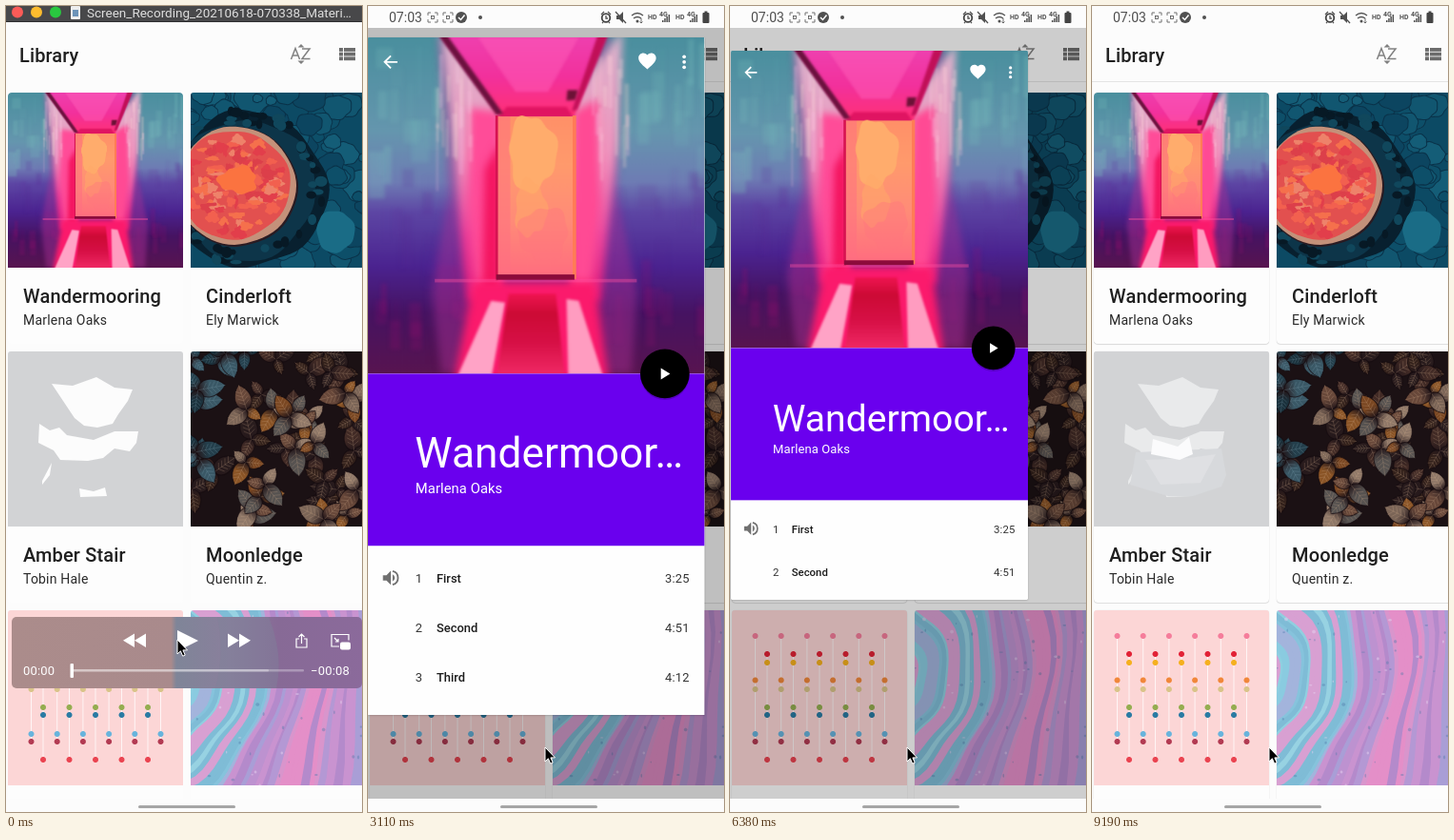
Animation, 374 px wide and 847 px high, one loop 9480 ms. Source, as an HTML page with a canvas:

```html
<!DOCTYPE html>
<html lang="en">
<head>
<meta charset="utf-8">
<title>Library</title>
<style>
  html, body { margin: 0; width: 100%; height: 100%; overflow: hidden; background: #fcfcfc; }
  #stage { position: absolute; left: 0; top: 0; width: 374px; height: 847px; overflow: hidden; background: #fcfcfc; }
  #stage div, #stage svg, #stage canvas { position: absolute; left: 0; top: 0; }
  svg { overflow: visible; pointer-events: none; }
  text { font-family: Roboto, "Open Sans", sans-serif; white-space: pre; }
  #clip { width: 374px; height: 833px; overflow: hidden; }
  .card { width: 184px; height: 264px; background: #fdfdfd; border-radius: 4px; }
  .card canvas { width: 184px; height: 184px; border-radius: 3px 3px 0 0; }
  .lined .card { box-shadow: 0 0 1px rgba(0,0,0,.2), 0 1px 1px rgba(0,0,0,.1); }
  #rule { width: 374px; height: 1px; top: 79px !important; background: #e4e4e4; }
  #scrim { width: 374px; height: 810px; top: 23px !important; background: #000; }
  #box { overflow: hidden; }
  #first, #detail { transform-origin: 0 0; }
  #detail { width: 383px; height: 810px; background: #fefefe; }
</style>
</head>
<body>
<div id="stage">
  <div id="clip">
    <div id="grid"></div>
    <svg id="bar" width="374" height="80"></svg>
    <div id="rule"></div>
    <div id="scrim"></div>
    <div id="box">
      <div id="first" class="card"></div>
      <div id="detail"></div>
    </div>
  </div>
  <svg id="status" width="374" height="23"></svg>
  <svg id="nav" width="374" height="847"></svg>
  <svg id="player" width="374" height="847"></svg>
  <svg id="cursor" width="20" height="24"></svg>
</div>
<script>
const $ = id => document.getElementById(id);
const clamp = v => Math.min(1, Math.max(0, v));
const mix = (a, b, k) => a + (b - a) * k;

function random(seed) {
  return () => (seed = seed * 16807 % 2147483647) / 2147483647;
}

function text(x, y, size, str, fill = '#1f1f1f', extra = '') {
  return `<text x="${x}" y="${y}" font-size="${size}" fill="${fill}" ${extra}>${str}</text>`;
}
const path = (d, fill, extra = '') => `<path d="${d}" fill="${fill}" ${extra}/>`;
const rect = (x, y, w, h, fill, extra = '') =>
  `<rect x="${x}" y="${y}" width="${w}" height="${h}" fill="${fill}" ${extra}/>`;
const dot = (x, y, r, fill, extra = '') => `<circle cx="${x}" cy="${y}" r="${r}" fill="${fill}" ${extra}/>`;

function canvas(size, paint) {
  const c = document.createElement('canvas');
  c.width = c.height = size;
  paint(c.getContext('2d'));
  return c;
}

function fade(g, x0, y0, x1, y1, stops) {
  const f = g.createLinearGradient(x0, y0, x1, y1);
  stops.forEach(([at, color]) => f.addColorStop(at, color));
  return f;
}

function poly(g, fill, ...pts) {
  g.beginPath();
  for (let i = 0; i < pts.length; i += 2) g.lineTo(pts[i], pts[i + 1]);
  g.closePath();
  g.fillStyle = fill;
  g.fill();
}

function blob(g, x, y, rx, ry, fill, wobble = 0, phase = 0) {
  g.beginPath();
  for (let a = 0; a < 6.28; a += 0.1) {
    const k = 1 + wobble * (Math.sin(3 * a + phase) + 0.6 * Math.sin(7 * a + phase * 2));
    g.lineTo(x + rx * k * Math.cos(a), y + ry * k * Math.sin(a));
  }
  g.closePath();
  g.fillStyle = fill;
  g.fill();
}

// Neon corridor, 383 units wide
function corridor(g) {
  const rnd = random(41);
  g.fillStyle = fade(g, 0, 0, 0, 383, [[0, '#4a8f9e'], [.28, '#6596ae'], [.43, '#6e7cb4'],
    [.52, '#5d46a4'], [.68, '#4b2390'], [.82, '#461362'], [1, '#581450']]);
  g.fillRect(0, 0, 383, 383);
  g.filter = 'blur(2px)';
  for (let i = 0; i < 130; i++) {
    const x = rnd() * 383, y = rnd() * 330;
    g.fillStyle = y < 140 ? `rgba(125,195,190,${rnd() * .3})`
      : y < 240 ? `rgba(90,45,150,${rnd() * .22})` : `rgba(150,15,110,${rnd() * .25})`;
    g.fillRect(x, y, 6 + rnd() * 16, 20 + rnd() * 40);
  }
  g.filter = 'blur(5px)';
  // Glowing walls on both sides of the door
  poly(g, 'rgba(170,50,150,.45)', 80, 0, 278, 0, 284, 180, 306, 290, 300, 383, 84, 383, 72, 290, 92, 180);
  poly(g, fade(g, 0, 0, 0, 300, [[0, '#dcb3cc'], [.45, '#ee94be'], [.75, '#ea3c98'], [1, '#e21b7c']]),
    82, -9, 150, 70, 152, 300, 112, 300, 104, 215, 98, 120);
  poly(g, fade(g, 0, 0, 0, 300, [[0, '#dcb3cc'], [.45, '#f093bd'], [.75, '#ec479e'], [1, '#e21b7c']]),
    290, -9, 232, 70, 230, 300, 265, 300, 274, 215, 284, 120);
  poly(g, '#ff4c98', 116, 80, 150, 85, 150, 300, 124, 300, 114, 190);
  poly(g, '#ff4a94', 234, 85, 262, 70, 264, 190, 252, 300, 232, 300);
  poly(g, '#f41560', 133, 150, 150, 120, 150, 290, 130, 290);
  poly(g, '#fb1a6c', 120, 278, 258, 278, 274, 390, 98, 390);
  g.filter = 'blur(1.5px)';
  for (let i = 0; i < 34; i++) {
    g.fillStyle = `rgba(250,${185 + rnd() * 45},${205 + rnd() * 25},.28)`;
    g.fillRect((i % 2 ? 254 : 76) + rnd() * 42, 15 + rnd() * 110, 2 + rnd() * 4, 20 + rnd() * 60);
  }
  poly(g, fade(g, 0, 0, 0, 90, [[0, '#ee3fae'], [.5, '#f2309c'], [1, '#ff2f75']]), 80, -5, 272, -5, 235, 90, 149, 90);
  poly(g, 'rgba(255,95,185,.5)', 125, 0, 240, 0, 205, 62, 168, 62);
  poly(g, '#e01462', 158, 79, 226, 79, 234, 91, 148, 91);
  poly(g, '#6b123e', 79, -4, 89, -4, 154, 87, 146, 88, 130, 66);
  poly(g, '#c01058', 262, -4, 274, -4, 238, 82, 232, 84);
  poly(g, '#6c1236', 227, 60, 239, 60, 236, 71, 226, 72);
  poly(g, '#ffa3c6', 140, 300, 156, 302, 140, 390, 100, 390);
  poly(g, '#ff9cc0', 226, 298, 240, 300, 269, 390, 228, 390);
  poly(g, fade(g, 0, 292, 0, 383, [[0, '#ee1450'], [.25, '#cc0a35'], [.6, '#d60f45'], [1, '#ef2863']]),
    160, 292, 214, 292, 224, 390, 146, 390);
  g.filter = 'none';
  g.fillStyle = fade(g, 0, 90, 0, 272, [[0, '#ff9068'], [.3, '#ff9a6c'], [.65, '#ff8b78'], [1, '#ff6d7f']]);
  g.fillRect(148, 90, 87, 185);
  g.fillStyle = 'rgba(255,110,130,.5)';
  g.fillRect(148, 90, 14, 182);
  blob(g, 187, 132, 27, 43, '#ffac6c', .09, 2);
  blob(g, 185, 195, 18, 32, 'rgba(255,170,105,.55)', .1, 1);
  blob(g, 200, 225, 28, 32, 'rgba(255,115,125,.4)', .1, 4);
  g.fillStyle = '#d61251';
  g.fillRect(145, 89, 3, 188);
  g.fillStyle = '#ff7c55';
  g.fillRect(233, 89, 4, 186);
  g.fillStyle = 'rgba(255,80,160,.4)';
  g.fillRect(76, 275, 230, 4);
  g.fillStyle = '#8c0b3b';
  g.fillRect(146, 270, 89, 6);
}

function cell(g) {
  const rnd = random(77);
  g.fillStyle = '#0c4a64';
  g.fillRect(0, 0, 184, 184);
  for (let i = 0; i < 90; i++) {
    const x = rnd() * 184, y = rnd() * 184, r = 4 + rnd() * 15;
    blob(g, x, y, r + 1, r * .85 + 1, '#0a3249', .06, i);
    blob(g, x, y, r, r * .85, ['#0d4f69', '#115670', '#0c4560', '#145d77'][i % 4], .06, i);
  }
  blob(g, 62, 102, 80, 82, '#08202f', .035, 1);
  blob(g, 58, 102, 73, 74, '#0d3549', .03, 3);
  for (let i = 0; i < 60; i++) {
    const a = rnd() * 6.28, r = 66 + rnd() * 16;
    blob(g, 58 + r * Math.cos(a), 100 + r * Math.sin(a), 3 + rnd() * 4, 2 + rnd() * 4, i % 2 ? '#071925' : '#10475c');
  }
  blob(g, 152, 146, 20, 22, '#1a6c86', .04, 2);
  blob(g, 49, 99, 63, 63, '#2a1b22', .012, 1);
  blob(g, 48, 98, 62, 62, '#c4917a', .012, 1);
  blob(g, 46, 97, 58, 57, '#e2504f', .02, 2);
  for (let i = 0; i < 110; i++) {
    const a = rnd() * 6.28, r = Math.sqrt(rnd()) * 52;
    blob(g, 46 + r * Math.cos(a), 96 + r * Math.sin(a), 2 + rnd() * 7, 2 + rnd() * 5,
      ['#f2604f', '#f5704c', '#e23e4b', '#ee826a', '#dc3f4a'][i % 5], .15, i);
  }
  blob(g, 50, 92, 20, 14, '#fb7340', .12, 5);
}

function leaf(g, x, y, len, angle, fill, vein) {
  g.save();
  g.translate(x, y);
  g.rotate(angle);
  g.beginPath();
  g.moveTo(0, 0);
  g.bezierCurveTo(len * .1, -len * .42, len * .65, -len * .42, len, 0);
  g.bezierCurveTo(len * .65, len * .42, len * .1, len * .42, 0, 0);
  g.fillStyle = fade(g, 0, 0, len, 0, [[0, '#24171a'], [.45, fill], [1, fill]]);
  g.fill();
  g.strokeStyle = 'rgba(20,10,14,.7)';
  g.stroke();
  g.strokeStyle = vein;
  g.lineWidth = .6;
  g.beginPath();
  g.moveTo(0, 0);
  g.lineTo(len, 0);
  for (let k = .2; k < .8; k += .15) {
    g.moveTo(len * (k + .14), -len * .2);
    g.lineTo(len * k, 0);
    g.lineTo(len * (k + .14), len * .2);
  }
  g.stroke();
  g.restore();
}

function leaves(g) {
  const rnd = random(905);
  g.fillStyle = '#1b1114';
  g.fillRect(0, 0, 184, 184);
  for (let i = 0; i < 46; i++) {
    const x = rnd() * 184, y = rnd() * 184, turn = rnd() * 6.28;
    const cold = x + y * .55 < 80;
    const tones = cold ? ['#243f4c', '#3a5866', '#1b323d'] : i < 24 ? ['#33211b', '#422b26', '#2a1d1e']
      : ['#8a5426', '#7b6557', '#68483a', '#8f7868', '#575351', '#7a4722'];
    for (let k = 0; k < 3; k++) {
      leaf(g, x, y, 16 + rnd() * 14, turn + k * 1.9, tones[(i + k) % tones.length],
        cold ? 'rgba(130,165,180,.35)' : 'rgba(215,180,145,.32)');
    }
  }
}

function beads(g) {
  g.fillStyle = '#fcd6d6';
  g.fillRect(0, 0, 184, 184);
  const column = (row, k) => row ? 37 + 27.5 * k : 24.5 + 27.2 * k;
  g.fillStyle = 'rgba(255,255,255,.75)';
  for (let k = 0; k < 6; k++) g.fillRect(column(0, k) - .5, 27, 1, 111);
  for (let k = 0; k < 5; k++) g.fillRect(column(1, k) - .5, 46, 1, 111);
  [[27, 0, '#f57d9b'], [46, 1, '#e22236'], [55, 1, '#f5b01e'], [73.5, 0, '#f1873a'], [83, 0, '#d9c489'],
   [102, 1, '#94ad50'], [110, 1, '#2a7ba3'], [130, 0, '#68b4dc'], [138, 0, '#b23a52'], [157, 1, '#ea4350']]
    .forEach(([y, row, color]) => {
      for (let k = 0; k < 6 - row; k++) blob(g, column(row, k), y, 3, 3, color);
    });
}

function marble(g) {
  const rnd = random(12);
  const cold = ['#8fcfe0', '#86c3dc', '#97d2e2', '#d8a0d2', '#8acbe0', '#a3b4dc', '#7fbcd6'];
  const warm = ['#bd92d0', '#d995cc', '#b48acb', '#a99ed6', '#c993d0', '#e48fc8', '#b498d4'];
  g.fillStyle = '#b98fce';
  g.fillRect(0, 0, 184, 184);
  for (let r = 270; r > 10; r -= 2 + rnd() * 6) {
    const set = r > 125 ? warm : cold;
    blob(g, -38 + r * .08, 66, r * .92, r * 1.12, set[Math.floor(rnd() * 7)], .04 + rnd() * .012, 1 + r * .018);
  }
  for (let i = 0; i < 60; i++) {
    blob(g, rnd() * 184, rnd() * 184, .6 + rnd() * 1.4, .6 + rnd() * 1.4, i % 3 ? 'rgba(80,120,170,.4)' : 'rgba(230,210,240,.5)');
  }
}

function mask(g) {
  g.fillStyle = '#d2d3d5';
  g.fillRect(0, 0, 184, 184);
  const a = '#fcfcfc';
  poly(g, a, 46, 34, 68, 36, 93, 27, 112, 38, 131, 40, 126, 52, 116, 66, 110, 76, 94, 80, 80, 78, 70, 70, 58, 52);
  poly(g, a, 33, 76, 44, 83, 54, 80, 62, 88, 90, 93, 112, 84, 137, 84, 135, 96, 128, 105, 112, 102, 100, 112, 84, 115, 55, 114, 48, 104, 32, 96);
  poly(g, a, 36, 136, 46, 117, 44, 130, 36, 140);
  poly(g, a, 75, 144, 90, 147, 102, 143, 104, 152, 76, 153);
}

function softMask(g) {
  mask(g);
  g.fillStyle = 'rgba(208,211,214,.45)';
  g.fillRect(0, 0, 184, 184);
  poly(g, '#d7d9dc', 44, 106, 134, 102, 139, 130, 134, 142, 104, 152, 78, 152, 38, 140);
  poly(g, '#dfe0e3', 54, 114, 100, 112, 128, 108, 112, 138, 70, 140);
  poly(g, '#fbfbfc', 62, 92, 88, 100, 100, 90, 104, 108, 90, 114, 60, 108);
}

// Cards
function cardText(title, artist) {
  return `<svg width="184" height="264">${
    text(16, 221, 20, title, '#1f1f1f', 'font-weight="500" letter-spacing=".15"')}${
    text(16, 244, 14, artist, '#2a2a2a', 'letter-spacing=".2"')}</svg>`;
}
function fillCard(el, art, title, artist) {
  el.innerHTML = cardText(title, artist);
  el.prepend(art);
}
const album = 'Wandermooring', singer = 'Marlena Oaks';
const masks = [canvas(184, mask), canvas(184, softMask)];
[[194, 91, canvas(184, cell), 'Cinderloft', 'Ely Marwick'],
 [2, 363, masks[0], 'Amber Stair', 'Tobin Hale'],
 [194, 363, canvas(184, leaves), 'Moonledge', 'Quentin z.'],
 [2, 635, canvas(184, beads), '', ''],
 [194, 635, canvas(184, marble), '', '']].forEach(([x, y, art, title, artist]) => {
  const el = document.createElement('div');
  el.className = 'card';
  fillCard(el, art, title, artist);
  if (art === masks[0]) art.after(masks[1]);
  $('grid').append(el);
  el.style.left = x + 'px';
  el.style.top = y + 'px';
});
fillCard($('first'), canvas(383, corridor), album, singer);

// Album page
const tracks = [['First', '3:25'], ['Second', '4:51'], ['Third', '4:12'], ['Fourth', '2:34']];
const heart = 'M12 21.350l-1.450-1.320C5.400 15.360 2 12.280 2 8.500 2 5.420 4.420 3 7.500 3c1.740 0 3.410.810 4.500 2.090C13.090 3.810 14.760 3 16.500 3 19.580 3 22 5.420 22 8.500c0 3.780-3.400 6.860-8.550 11.540z';
$('detail').innerHTML = `<svg width="383" height="810">
  ${rect(0, 383, 383, 196, '#6a00ee')}
  ${path('M33.500 28H19M26 21l-7 7 7 7', 'none', 'stroke="#fff" stroke-width="2"')}
  ${path(heart, '#fff', 'transform="translate(306 15)"')}
  ${[22, 28, 34].map(y => dot(360, y, 2, '#fff')).join('')}
  ${text(53.5, 490, 48, album.slice(0, 10) + '…', '#fff')}
  ${text(54, 519, 16, singer, '#fff', 'letter-spacing=".1"')}
  ${dot(338, 385, 28, 'rgba(0,0,0,.18)')}${dot(338, 383, 28, '#000')}
  ${path('M333.500 376.500v13l10.500-6.500z', '#fff')}
  <g transform="translate(14 603.500)">
    ${path('M3 9v6h4l5 5V4L7 9zM14 8v8q2.500-1.200 2.500-4T14 8z', '#707070')}
    ${path('M14 4.300a7.900 7.900 0 0 1 0 15.400', 'none', 'stroke="#707070" stroke-width="2"')}
  </g>
  ${tracks.map(([name, time], i) => {
    const y = 621 + 56.2 * i;
    return text(54, y, 14, i + 1, '#333') + text(78, y, 14, name, '#1c1c1c', 'font-weight="500"') +
      text(366, y, 14, time, '#333', 'text-anchor="end" letter-spacing=".2"');
  }).join('')}</svg>`;
$('detail').prepend(canvas(383, corridor));

// App bar
$('bar').innerHTML = text(14, 59, 20, 'Library', '#1f1f1f', 'font-weight="500" letter-spacing=".1"') +
  path('M299.500 56l4.500-11.500 4.500 11.500M301 52h6M311 45h8l-8 10.500h8.500', 'none', 'stroke="#808080" stroke-width="1.500"') +
  path('M306.500 43.500l3.500-3.500 3.500 3.500zM306.500 57.500l3.500 3.500 3.500-3.500z', '#808080') +
  [44, 48.7, 53.4].map(y => rect(350, y, 4, 3.8, '#6c6c6c') + rect(355, y, 12, 3.8, '#6c6c6c')).join('');

// System bars
const ink = '#505050', line = `stroke="${ink}" stroke-width="1.300"`;
const scan = x => path(`M${x - 5} 10v-3h3m4 0h3v3m0 4v3h-3m-4 0h-3v-3`, 'none', 'stroke="#707070"') +
  rect(x - 1.5, 10.5, 3, 3, 'none', `stroke="${ink}" stroke-width=".8"`);
const signal = x => text(x, 14, 7, 'HD', ink, 'font-weight="700"') +
  text(x + 12, 10.5, 7, '4G', ink, 'font-weight="700"') +
  [0, 1, 2, 3].map(i => rect(x + 15 + i * 2.2, 15 - i * 2, 1.5, 2 + i * 2, ink)).join('');
$('status').innerHTML = rect(0, 0, 374, 23, '#fcfcfc') +
  text(22, 17, 14, '07:03', ink) + scan(68) + scan(84) +
  dot(98, 12, 6, ink) + path('M95 12l2.500 2.500 4-5', 'none', 'stroke="#fff" stroke-width="1.500"') + dot(118, 12, 2, ink) +
  dot(250, 12.5, 4.3, 'none', 'stroke="#444" stroke-width="1.800"') +
  path('M250 10v3h2M245 9l3-3M255 9l-3-3M246 18l1-1M254 18l-1-1', 'none', line) +
  path('M261 10h3l4-4v12l-4-4h-3z', ink) + path('M260 6l11 12', 'none', line) +
  path('M277 10q6-5 12 0M279 13q4-3 8 0', 'none', line) + dot(283, 16, 1.5, ink) +
  path('M287 13v5m-1.500-1.500l1.500 1.500 1.500-1.500', 'none', 'stroke="#505050" stroke-width=".8"') +
  signal(294) + signal(323) + rect(351.5, 7, 7, 11, '#444', 'rx="1"') + rect(353.5, 5.5, 3, 2, '#444');
$('nav').innerHTML = rect(0, 833, 374, 14, '#fcfcfc') + rect(0, 833, 374, 1, '#b8b8b8', 'id="navLine"') +
  rect(139, 840, 102, 3, '#a6a6a6', 'rx="1.500"');

// Recording window controls
$('player').innerHTML = `<defs><linearGradient id="glass">
    <stop offset="0" stop-color="#ab8c8b"/><stop offset=".455" stop-color="#a98a8c"/>
    <stop offset=".47" stop-color="#7f8598"/><stop offset=".62" stop-color="#8a7f9c"/>
    <stop offset=".76" stop-color="#876a96"/><stop offset="1" stop-color="#8b6a9b"/></linearGradient></defs>` +
  rect(0, 0, 374, 23, '#fcfcfc') + rect(0, 0, 374, 17, '#48484a') + rect(0, 16, 374, 1, '#2f2f31') +
  ['#fc5b57', '#fdbc2e', '#29c840'].map((c, i) => dot(12 + 20 * i, 6.5, 6, c)).join('') +
  rect(68, 0, 10, 14, '#eee', 'rx="1"') + rect(70, 4, 6, 7, '#6c93b8') +
  text(85, 12, 13.5, 'Screen_Recording_20210618-070338_Materi…', '#dedede') +
  rect(6, 642, 368, 75, 'url(#glass)', 'rx="5"') +
  path('M222 642h54q16 40 8 75h-64q10-38 2-75z', '#7f8099', 'opacity=".45"') +
  path('M135 659.500v14.500l-12-7.200zM147 659.500v14.500l-12-7.200zM233 659.500v14.500l12-7.200zM245 659.500v14.500l12-7.200z', '#fff') +
  path('M180 656v22l22-11z', '#fff', 'id="play"') + path('M182 657h6v20h-6zM193 657h6v20h-6z', '#fff', 'id="pause"') +
  path('M308 665h-3v9h11v-9h-3M310.500 670v-10M307.500 663l3-3 3 3', 'none', 'stroke="#fff" stroke-width="1.200"') +
  path('M350 673h-8v-12.500h18v6M345 664l4 4m0-3v3h-3', 'none', 'stroke="#fff" stroke-width="1.200"') + rect(351, 668.5, 11, 8, '#fff', 'rx="2"') +
  text(18, 703, 13, '00:00', '#fff', 'letter-spacing=".2"') + text(320, 703, 13, '−00:08', '#fff', 'letter-spacing=".2"') +
  rect(70, 697, 243, 2.5, '#fff', 'opacity=".3" rx="1"') + rect(70, 697, 206, 2.5, '#fff', 'opacity=".3" rx="1"') +
  rect(67.5, 691, 3.5, 15, '#fff', 'rx="1"');
$('cursor').innerHTML = path('M0 0v15l3.400-3.200 2.300 5.400 2.500-1.100-2.300-5.200h4.600z', '#000', 'stroke="#fff" stroke-width="1"');

// Timeline
const LOOP = 9480, STEP = 148.15, OPEN = 1405, CLOSE = 5490, SPAN = 3000;

// cubic-bezier(.4, 0, .2, 1)
function ease(x) {
  let lo = 0, hi = 1, s = .5;
  for (let i = 0; i < 24; i++) {
    s = (lo + hi) / 2;
    const bx = 1.2 * s * (1 - s) ** 2 + .6 * s * s * (1 - s) + s ** 3;
    if (bx < x) lo = s; else hi = s;
  }
  return s * s * (3 - 2 * s);
}

const hold = t => t < 150 ? 0 : t < 434 ? 150 : 450 + STEP * Math.floor((t - 434) / STEP);

function pose(t) {
  if (t < CLOSE) {
    const p = t <= OPEN ? 0 : t >= OPEN + SPAN ? 1 : ease((t - OPEN) / SPAN);
    return { p, reveal: p, alpha: clamp(p / .25) };
  }
  const back = t >= CLOSE + SPAN ? 1 : ease((t - CLOSE) / SPAN);
  return { p: 1 - back, reveal: 1 - clamp(back / .9), alpha: 1 - clamp((back - .6) / .3) };
}

function render(t) {
  const { p, reveal, alpha } = pose(t);
  const w = mix(184, 383, p), cardScale = w / 184, pageScale = w / 383;
  Object.assign($('box').style, {
    left: mix(94, 191.5, p) - w / 2 + 'px',
    top: mix(91, 23, p) + 'px',
    width: w + 'px',
    height: mix(264 * cardScale, 810 * pageScale, reveal) + 'px',
    borderRadius: 4 * (1 - p) + 'px',
    boxShadow: t > 1500 ? `0 0 1px rgba(0,0,0,.2), 0 1px ${p > 0 ? 2 : 1}px rgba(0,0,0,.12)` : 'none'
  });
  $('first').style.transform = `scale(${cardScale})`;
  $('detail').style.transform = `scale(${pageScale})`;
  $('detail').style.opacity = alpha;
  $('scrim').style.opacity = .29 * p;

  const lined = t > 1700;
  $('grid').className = lined ? 'lined' : '';
  $('rule').style.opacity = +lined;
  $('navLine').style.opacity = +(p > .985);
  masks[1].style.opacity = +(t > 6900);

  $('player').style.opacity = 1 - clamp((t - 600) / 500);
  const playing = t >= 450;
  $('play').style.opacity = +!playing;
  $('pause').style.opacity = +playing;

  const move = clamp((t - 450) / 600), glide = move * move * (3 - 2 * move);
  const nudge = t >= 150 ? 3 : 0;
  $('cursor').style.transform = `translate(${mix(180 + nudge, 186, glide)}px, ${mix(666 + nudge, 779, glide)}px)`;
}

const start = performance.now();
function tick() {
  render(hold((performance.now() - start) % LOOP));
  requestAnimationFrame(tick);
}
tick();
</script>
</body>
</html>
```
